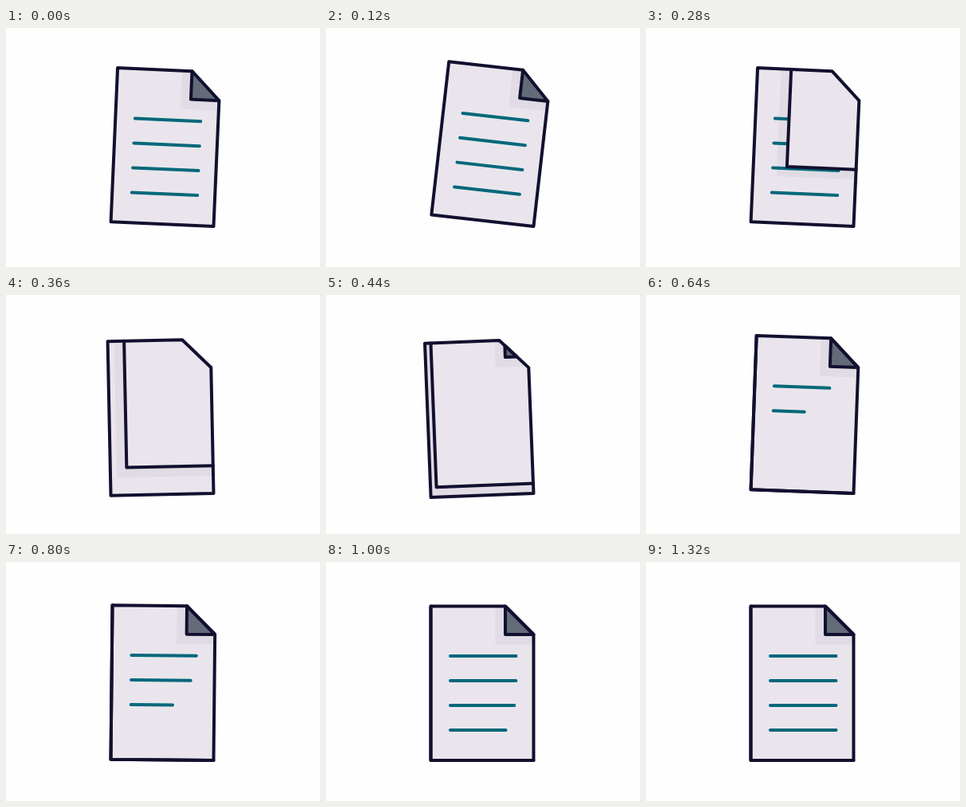
An HTML page with a canvas for the animation above (1.88 s loop, 394 px wide and 300 px high).

```html
<!DOCTYPE html>
<html lang="en">
<head>
<meta charset="utf-8">
<title>Turning page</title>
<style>
  html, body { margin: 0; width: 100%; height: 100%; overflow: hidden; background: #fefefe; }
  canvas { display: block; }
</style>
</head>
<body>
<canvas id="stage" width="394" height="300"></canvas>
<script>
const ctx = document.getElementById('stage').getContext('2d');
const LOOP = 1880, STEP = 40;
const INK = '#12102f', PAPER = '#eae5ec', SHADE = '#e0dbe4', TEAL = '#00687a';
const FOLD_RGB = [100, 107, 120], PAPER_RGB = [234, 229, 236];
const L = 131.5, T = 55.5, R = 260.5, B = 249, FOLD = 35.5, DROP = 12.5;
const CUT_X = R - FOLD, CUT_Y = T + FOLD;

// Tilt in degrees about the bottom right corner: [time, angle]
const TILT = [[0, 2.5], [120, 6.5], [160, 7], [280, 2.5], [400, -3], [440, -2.25],
              [640, 2.1], [800, 0.6], [920, 0], [LOOP, 0]];

const clamp = x => Math.min(1, Math.max(0, x));
const lerp = (a, b, k) => a + (b - a) * k;
const easeOut = (t, start, length, power) => 1 - (1 - clamp((t - start) / length)) ** power;

function tiltAt(t) {
  const i = TILT.findIndex(key => key[0] > t);
  const [t0, a0] = TILT[i - 1], [t1, a1] = TILT[i];
  return lerp(a0, a1, (t - t0) / (t1 - t0));
}

function path(points, closed) {
  ctx.beginPath();
  points.forEach(([x, y]) => ctx.lineTo(x, y));
  if (closed) ctx.closePath();
}

function stroke(color) {
  ctx.strokeStyle = color;
  ctx.stroke();
}

const pagePath = () => path([[L, T], [CUT_X, T], [R, CUT_Y], [R, B], [L, B]], true);

// Rectangle from (x, y) to the top right corner, kept inside the page
function cornerRect(x, y, color) {
  ctx.save();
  pagePath();
  ctx.clip();
  ctx.fillStyle = color;
  ctx.fillRect(x, T, R - x, y - T);
  ctx.restore();
}

function textLine(i, amount) {
  if (amount <= 0) return;
  const y = 118 + 31 * i;
  path([[156, y], [156 + 82.5 * amount, y]]);
  stroke(TEAL);
}

function turningSheet(t) {
  const p = easeOut(t, 160, 440, 2.5);
  const x = lerp(CUT_X, L, p), y = lerp(CUT_Y, B, p);
  const light = clamp((t - 160) / 80);
  const fill = FOLD_RGB.map((c, i) => Math.round(lerp(c, PAPER_RGB[i], light)));
  cornerRect(x - DROP, y + DROP, SHADE);
  for (let i = 0; i < 4; i++) textLine(i, 1);
  cornerRect(x, y, `rgb(${fill})`);
  path([[x, T], [x, y], [R, y]]);
  stroke(INK);
}

function newFold(t) {
  const q = easeOut(t, 400, 320, 4);
  if (q <= 0) return;
  const size = FOLD * q, shift = 0.32 * (FOLD - size);
  const x = CUT_X + shift, y = T + shift;
  cornerRect(x - DROP, y + size + DROP, SHADE);
  path([[x, y], [x, y + size], [x + size, y + size]], true);
  ctx.fillStyle = `rgb(${FOLD_RGB})`;
  ctx.fill();
  stroke(INK);
}

function draw(t) {
  ctx.fillStyle = '#fefefe';
  ctx.fillRect(0, 0, 394, 300);
  ctx.save();
  ctx.translate(R, B);
  ctx.rotate(tiltAt(t) * Math.PI / 180);
  ctx.translate(-R, -B);
  ctx.lineWidth = 4;
  ctx.lineCap = ctx.lineJoin = 'round';

  pagePath();
  ctx.fillStyle = PAPER;
  ctx.fill();
  turningSheet(t);
  newFold(t);
  for (let i = 0; i < 4; i++) textLine(i, easeOut(t, 440 + 120 * i, 540, 4));
  pagePath();
  stroke(INK);
  ctx.restore();
}

const start = performance.now();
function tick() {
  const t = (performance.now() - start) % LOOP;
  draw(Math.floor(t / STEP) * STEP);
  requestAnimationFrame(tick);
}
tick();
</script>
</body>
</html>
```
